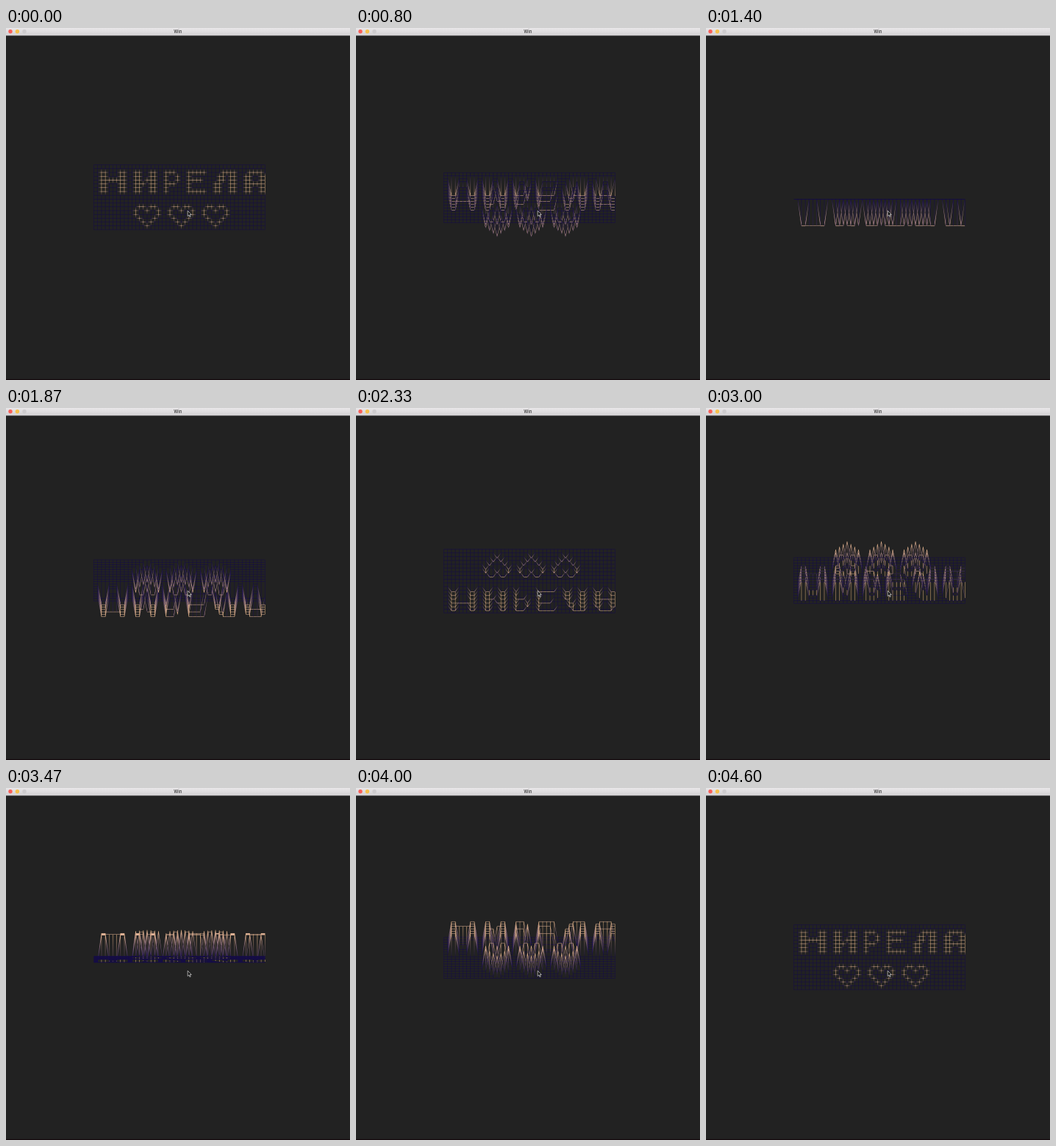
Recreate the animation shown at these times as an HTML page with a canvas. Size 468 px wide and 480 px high, loop 4.94 s.

```html
<!DOCTYPE html>
<html lang="ru">
<head>
<meta charset="utf-8">
<title>Win</title>
<style>
  html, body { margin: 0; width: 100%; height: 100%; overflow: hidden; background: #222; }
  #stage { position: absolute; left: 0; top: 0; width: 468px; height: 480px; overflow: hidden; }
  canvas, svg { position: absolute; left: 0; top: 0; width: 468px; height: 480px; }
  text { font: 500 6px Inter, "Liberation Sans", sans-serif; fill: #333; text-anchor: middle; }
</style>
</head>
<body>
<div id="stage">
  <canvas id="view" width="468" height="480"></canvas>
  <svg viewBox="0 0 468 480">
    <defs>
      <linearGradient id="bar" x1="0" y1="0" x2="0" y2="1">
        <stop offset="0" stop-color="#e9e7e9"/>
        <stop offset="1" stop-color="#d2d0d2"/>
      </linearGradient>
    </defs>
    <rect width="468" height="10.4" fill="url(#bar)"/>
    <circle cx="6" cy="4.8" r="2.7" fill="#f95f57"/>
    <circle cx="15.4" cy="4.8" r="2.7" fill="#f6c04a"/>
    <circle cx="25" cy="4.8" r="2.7" fill="#cdcbcd"/>
    <text x="233.7" y="7">Win</text>
    <rect y="478.8" width="468" height="1.2" fill="#150a0d"/>
    <path d="M247.2 249.2v7.3l1.7-1.5 1.2 2.7 1.1-.5-1.2-2.6h2.3z"
          fill="#111" stroke="#ddd" stroke-width=".7" stroke-linejoin="round"/>
  </svg>
</div>
<script>
const COLS = 46, ROWS = 18;
const LEFT = 119.6, STEP_X = 5.17, STEP_Y = 5.2;
const PIVOT_Y = 233.4, PIVOT_ROW = 9, HEIGHT = 36.4;
const LOOP = 4940, TICK = 200 / 3, STEPS = 64;
const BASE = '#140b4a', PEAK = '#f0bfa2', GOLD = '#e8b87c';

const HEART = '.##.##. #..#..# #.....# .#...#. ..#.#.. ...#...';
// column, row, rows of the glyph
const GLYPHS = [
  [2, 2, '##...## ##...## ####### ##...## ##...## ##...##'],
  [11, 2, '##..## ##..## ##.### ###.## ##..## ##..##'],
  [19, 2, '###. #..# #..# ###. #... #...'],
  [25, 2, '##### #.... ####. #.... #.... #####'],
  [32, 2, '..#### .##.## .##.## ##..## ##..## ##..##'],
  [40, 2, '.####. ##..## ##..## ###### ##..## ##..##'],
  [11, 11, HEART], [20, 11, HEART], [29, 11, HEART]
];

const raised = Array.from({ length: ROWS }, () => Array(COLS).fill(0));
for (const [col, row, rows] of GLYPHS)
  rows.split(' ').forEach((line, r) =>
    [...line].forEach((ch, c) => { if (ch === '#') raised[row + r][col + c] = 1; }));

// Lines are painted opaque on a fine sheet, so that later ones cover earlier
// ones, and the sheet is then scaled down to the view.
const FINE = 4;
const AREA = { x: 112, y: 172, w: 248, h: 120 };
const sheet = document.createElement('canvas');
sheet.width = AREA.w * FINE;
sheet.height = AREA.h * FINE;
const ctx = sheet.getContext('2d');
ctx.scale(FINE, FINE);
ctx.translate(-AREA.x, -AREA.y);
ctx.lineWidth = 0.47;

const view = document.getElementById('view').getContext('2d');
view.imageSmoothingQuality = 'high';

function project(col, row, angle) {
  const up = raised[row][col];
  return {
    x: LEFT + col * STEP_X,
    y: PIVOT_Y + (row - PIVOT_ROW) * STEP_Y * Math.cos(angle) + up * HEIGHT * Math.sin(angle),
    up
  };
}

function edgeColor(a, b, top) {
  const from = a.up ? top : BASE, to = b.up ? top : BASE;
  // vertical edges that climb on screen take the tone of their end
  if (from === to || (a.x === b.x && b.y < a.y)) return to;
  const fade = ctx.createLinearGradient(a.x, a.y, b.x, b.y);
  fade.addColorStop(0, from);
  fade.addColorStop(1, to);
  return fade;
}

function edge(a, b, top) {
  ctx.strokeStyle = edgeColor(a, b, top);
  ctx.beginPath();
  ctx.moveTo(a.x, a.y);
  ctx.lineTo(b.x, b.y);
  ctx.stroke();
}

function draw(step) {
  const angle = step / STEPS * 2 * Math.PI;
  const pts = raised.map((line, r) => line.map((_, c) => project(c, r, angle)));
  ctx.clearRect(AREA.x, AREA.y, AREA.w, AREA.h);
  for (let r = 0; r < ROWS; r++)
    for (let c = 0; c < COLS; c++) {
      if (c + 1 < COLS) edge(pts[r][c], pts[r][c + 1], PEAK);
      if (r + 1 < ROWS) edge(pts[r][c], pts[r + 1][c], GOLD);
    }
  view.clearRect(0, 0, 468, 480);
  view.drawImage(sheet, AREA.x, AREA.y, AREA.w, AREA.h);
}

// The turn advances in equal steps, with a slow start and a rest at the end.
function stepAt(t) {
  if (t < 200) return 0;
  if (t < 470) return 1;
  let k = Math.floor((t + 5) / TICK);
  if (Math.round(k * TICK / 10) * 10 > t) k--;
  return Math.min(k - 5, STEPS);
}

let shown = -1;
const start = performance.now();
function frame() {
  const step = stepAt((performance.now() - start) % LOOP);
  if (step !== shown) draw(shown = step);
  requestAnimationFrame(frame);
}
frame();
</script>
</body>
</html>
```
